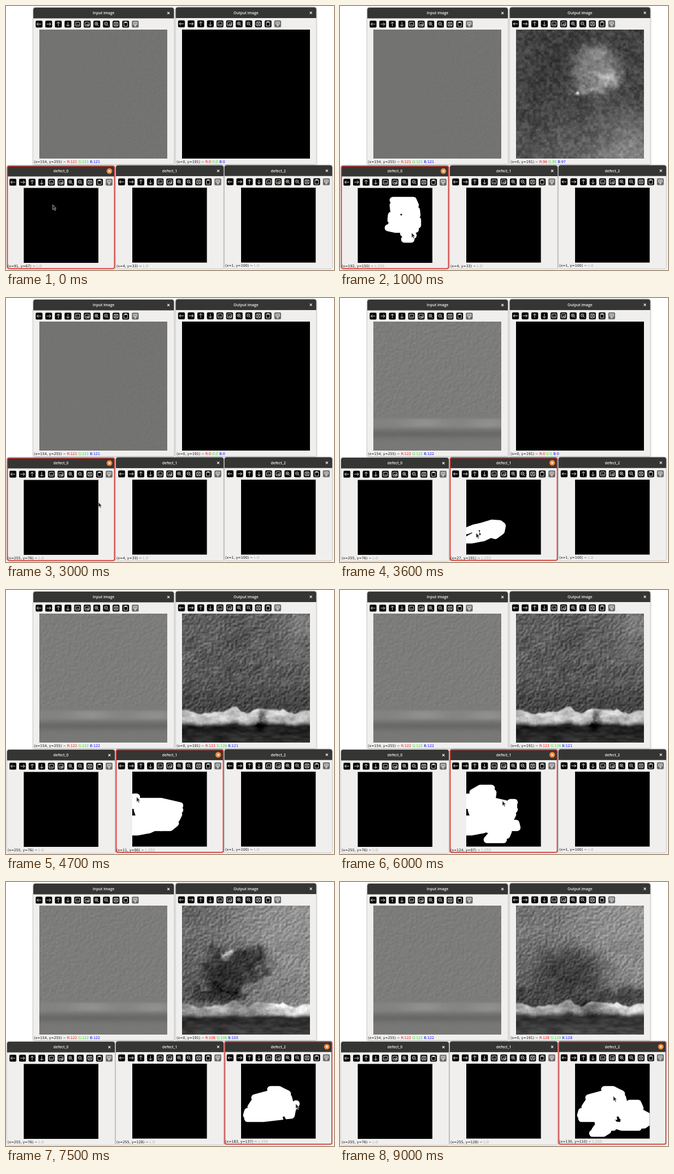
An HTML page with a canvas for the animation above (9.2 s loop, 600 px wide and 481 px high).

```html
<!DOCTYPE html>
<html lang="en">
<head>
<meta charset="utf-8">
<title>Defect painter</title>
<style>
html, body { margin: 0; width: 600px; height: 481px; overflow: hidden; background: #fff; }
#stage, canvas { position: absolute; left: 0; top: 0; }
.win { filter: drop-shadow(0 .6px 1.6px rgba(0,0,0,.5)); }
.title { font: 600 6.8px "Open Sans", sans-serif; fill: #f4f4f2; text-anchor: middle; }
.status { font: 6.35px "DejaVu Sans", sans-serif; fill: #111; white-space: pre; }
.brush { fill: none; stroke: #fff; stroke-width: 12.6; stroke-linecap: round; stroke-linejoin: round; }
.line { fill: none; stroke: #fff; stroke-width: .9; }
</style>
</head>
<body>
<svg id="stage" width="600" height="481" viewBox="0 0 600 481"></svg>
<canvas id="input" width="234" height="235" style="left:61px;top:43px"></canvas>
<canvas id="output" width="234" height="235" style="left:322px;top:43px"></canvas>
<script>
const LOOP = 9200, STEP = 100;
const $ = id => document.getElementById(id);

// ---------- textures ----------
const mix = (a, b, k) => a + (b - a) * k;
const clamp = (v, lo, hi) => Math.max(lo, Math.min(hi, v));
const ramp = (a, b, v) => { const k = clamp((v - a) / (b - a), 0, 1); return k * k * (3 - 2 * k); };

function hash(i, j) {
  let n = Math.imul(i, 374761393) + Math.imul(j, 668265263);
  n = Math.imul(n ^ n >>> 13, 1274126177);
  return ((n ^ n >>> 16) >>> 0) / 2 ** 32;
}
function noise(x, y) {
  const i = Math.floor(x), j = Math.floor(y), u = ramp(0, 1, x - i), v = ramp(0, 1, y - j);
  return mix(mix(hash(i, j), hash(i + 1, j), u), mix(hash(i, j + 1), hash(i + 1, j + 1), u), v) - .5;
}
const cloud = (x, y, s) => noise(x / s, y / s) + noise(x / s * 2 + 40, y / s * 2) / 2 + noise(x / s * 4, y / s * 4 + 70) / 4;
const relief = (x, y, s) => noise(x / s, y / s) - noise((x + 1.4) / s, (y + 1.4) / s);
const blob = (x, y, cx, cy, rx, ry, k = 2) => Math.exp(-(Math.hypot((x - cx) / rx, (y - cy) / ry) ** k));

function texture(shade, tint = 0) {
  const c = document.createElement('canvas');
  c.width = 234; c.height = 235;
  const g = c.getContext('2d'), im = g.createImageData(234, 235);
  for (let y = 0, p = 0; y < 235; y++) for (let x = 0; x < 234; x++, p += 4) {
    const v = shade(x + 322, y + 43);
    im.data[p] = im.data[p + 1] = v;
    im.data[p + 2] = v - tint;
    im.data[p + 3] = 255;
  }
  g.putImageData(im, 0, 0);
  return c;
}

const flat = (x, y) => 115 + 3 * noise(x / 1.5, y / 1.5) + 5 * relief(x, y, 3) * ramp(330, 520, x);

function faintSeam(x, y) {
  let v = 124 + 16 * relief(x, y, 4) * (1 - ramp(205, 222, y)) + 3 * noise(x / 2, y / 2);
  v += ramp(216, 222, y) * (1 - ramp(232, 240, y)) * (6 + 14 * blob(x, y, 415, 227, 40, 12) + 14 * blob(x, y, 530, 229, 35, 12));
  return v - 18 * blob(x, y, 440, 247, 400, 8) - 4 * ramp(236, 260, y);
}

function mottled(x, y, lit) {
  return 66 + 34 * cloud(x, y, 5) + 16 * cloud(x, y, 40) + lit * (52 * ramp(150, 290, y) * ramp(330, 550, x) + 14 * ramp(120, 280, y));
}

function patch(x, y) {
  const wx = x + 14 * cloud(x, y, 12), wy = y + 14 * cloud(y, x, 12);
  let v = mottled(x, y, 1);
  v += 52 * blob(wx, wy, 467, 116, 46, 50, 6);
  v += 72 * blob(wx, wy, 489, 132, 19, 15) + 45 * blob(wx, wy, 452, 154, 28, 7);
  v += 130 * blob(x, y, 434, 158, 3, 3) + 24 * blob(x, y, 462, 85, 26, 14);
  return v;
}

const crater = tail => (x, y) => {
  const wx = x + 15 * cloud(x, y, 13), wy = y + 15 * cloud(y, x, 13);
  let v = mottled(x, y, .1) - 4;
  const body = Math.max(blob(wx, wy, 470, 116, 44, 48, 5), blob(wx, wy, 465, 165, 50, 54, 5),
    tail * blob(wx, wy + (wx - 400) * .6, 402, 208, 24, 38, 3) * .55);
  v = mix(v, 112 + 30 * cloud(x, y, 5), body);
  v += 60 * blob(wx, wy, 452, 160, 25, 20) + 95 * blob(x, y, 444, 85, 6, 5);
  v += 45 * blob(wx, wy, 465, 207, 36, 8) + 50 * blob(wx, wy, 440, 190, 12, 14);
  v = mix(v, 52 + 30 * cloud(x, y, 6), blob(wx, wy, 467, 192, 26, 13, 4));
  v -= 60 * blob(wx, wy, 460, 181, 26, 2.5);
  if (tail) {
    v += 115 * blob(wx, wy, 383, 240, 9, 8, 3) + 45 * blob(wx, wy, 411, 211, 14, 7);
    v -= 34 * blob(wx, wy, 380, 222, 9, 7);
  }
  return v;
};

function seam(v, x, y, top, bottom, bright, under) {
  const w = 12 * cloud(x, 3, 22);
  v = mix(v, under + 26 * cloud(x, y * 3, 16) + 18 * ramp(250, 278, y), ramp(bottom - 4, bottom + 5, y));
  const k = ramp(top - 2, top + 3, y + w) * (1 - ramp(bottom - 8, bottom + 4, y + w * .5));
  return mix(v, bright + 60 * cloud(x, y * 2, 18) + 18 * cloud(x, y, 3), k);
}
const plaster = (x, y) => 60 * relief(x, y, 4) + 14 * cloud(x, y, 4);

function ridge(x, y) {
  let v = 88 + 32 * ramp(440, 556, x) * (1 - ramp(60, 200, y)) + plaster(x, y) + 22 * cloud(x, y, 24);
  v += 40 * Math.max(0, cloud(x, y, 11)) * blob(x, y, 440, 140, 100, 45);
  v = mix(v, 62 + plaster(x, y), .7 * ramp(160, 205, y));
  v = seam(v, x, y, 218, 244, 190 + 25 * blob(x, y, 420, 230, 60, 40), 30);
  return v - 110 * blob(x + 8 * cloud(x, y, 9), y, 467, 233, 7, 14);
}

function hollow(x, y) {
  const wx = x + 20 * cloud(x, y, 15), wy = y + 20 * cloud(y, x, 15);
  let v = 104 + 42 * ramp(330, 540, x) - 10 * ramp(100, 215, y) + plaster(x, y) + 14 * cloud(x, y, 30);
  const hole = Math.max(blob(wx, wy, 402, 163, 42, 46, 5), blob(wx, wy, 440, 147, 44, 34, 5), blob(wx, wy, 392, 199, 46, 18, 5));
  v = mix(v, 47 + plaster(x, y) * .7 + 20 * cloud(x, y, 14), hole);
  v += 130 * blob(wx, wy, 409, 127, 8, 8) + 45 * blob(wx, wy, 462, 150, 12, 7);
  v -= 26 * blob(wx, wy, 400, 194, 45, 3);
  return seam(v, x, y, 221, 243, 150 + 80 * ramp(440, 520, x) + 40 * blob(x, y, 390, 228, 28, 12), 44);
}

function stain(x, y) {
  const wx = x + 16 * cloud(x, y, 18), wy = y + 16 * cloud(y, x, 18);
  let v = 118 + 30 * ramp(360, 556, x) - 8 * ramp(50, 180, y) + plaster(x, y) + 14 * cloud(x, y, 30);
  const dark = Math.max(.95 * blob(wx, wy, 418, 170, 72, 52, 4), .85 * ramp(175, 206, wy));
  v = mix(v, 60 + plaster(x, y) * .8 + 20 * cloud(x, y, 15), dark);
  v = seam(v, x, y, 220, 241, 172 + 45 * ramp(480, 520, x), 52);
  return v - 60 * blob(x, y, 456, 230, 22, 12);
}

const black = texture(() => 0);
const inputs = [texture(flat, 2), texture(faintSeam, 2)];
const outputs = [
  [0, black, 0, 0, 0],
  [700, texture(patch), 96, 95, 97],
  [1300, texture(crater(0)), 90, 89, 90],
  [2000, texture(crater(1)), 85, 85, 86],
  [3000, black, 0, 0, 0],
  [4300, texture(ridge), 123, 126, 121],
  [6300, black, 0, 0, 0],
  [7200, texture(hollow), 108, 106, 105],
  [8300, texture(stain), 128, 129, 128]
];

// ---------- windows ----------
const wins = [
  { title: 'Input image', x: 50, y: 3, w: 257, h: 285.5, tool: 60.5, sx: 51 },
  { title: 'Output image', x: 310.5, y: 2.5, w: 257, h: 286, tool: 321, sx: 312 },
  { title: 'defect_0', x: 2, y: 291, w: 197, h: 188, tool: 12.6, sx: 3, ix: 32.5, iy: 331.5 },
  { title: 'defect_1', x: 201, y: 290.5, w: 197, h: 188, tool: 211.5, sx: 202, ix: 231, iy: 331 },
  { title: 'defect_2', x: 399.7, y: 290.3, w: 197, h: 188, tool: 410, sx: 401, ix: 430, iy: 331 }
];
const SIDE = 136.5, UNIT = SIDE / 256;

const arrow = '<path class="line" d="M4 0H-4M-1-3L-4 0L-1 3"/>';
const lens = sign => `<circle class="line" cx="-.8" cy="-.8" r="2.8"/><path class="line" d="M1.3 1.3L4 4M-2.2-.8H.6${sign}"/>`;
const frame = '<rect class="line" x="-3.8" y="-3.6" width="7.6" height="7.2" rx=".8"/>';
const icons = [
  arrow,
  `<g transform="rotate(180)">${arrow}</g>`,
  `<g transform="rotate(90)">${arrow}</g>`,
  `<g transform="rotate(-90)">${arrow}</g>`,
  frame + '<path class="line" d="M-2.4 2L-.8.4L.4 1.6L2.4 1.4M-1.8-1.6H-.6"/>',
  frame + '<path class="line" d="M-2.6 2L-.8 0L.6 1.4"/><circle class="line" cx="1.6" cy="1.2" r="1.6"/>',
  lens('M-.8-2.2V.6'),
  lens(''),
  frame + '<path class="line" d="M-1.8-3.4V-1.2H1.8V-3.4M-1.8 3.4V.8H1.8V3.4"/>',
  '<path class="line" d="M-3.2-3.4H3.2V4H-3.2ZM-1.4-4.2H1.4V-2.6H-1.4Z"/>',
  '<path class="line" d="M-3.4-3.6H3.4V.6H-3.4ZM-2-1.6H2M-1 .8V3.8H1V.8"/>'
];

function windowMarkup(o, i) {
  const { x, y, w, h } = o, cx = x + w - 9.8, cy = y + 9.8;
  const top = `M${x} ${y + 19.5}V${y + 4}q0-4 4-4H${x + w - 4}q4 0 4 4V${y + 19.5}Z`;
  const tools = icons.map((ic, k) =>
    `<g transform="translate(${o.tool + k * 17.6} ${y + 30})"><rect x="-6.2" y="-6.2" width="12.4" height="12.4" rx="2" fill="${k < 10 ? '#000' : '#6a6a6a'}"/>${ic}</g>`).join('');
  const mask = o.ix === undefined ? '' :
    `<clipPath id="clip${i}"><rect x="${o.ix}" y="${o.iy}" width="${SIDE}" height="${SIDE}"/></clipPath>
     <rect x="${o.ix}" y="${o.iy}" width="${SIDE}" height="${SIDE}"/><g id="mask${i}" clip-path="url(#clip${i})"></g>`;
  return `<g class="win"><rect x="${x}" y="${y + 8}" width="${w}" height="${h - 8}" fill="#f0efee"/><path d="${top}" fill="#353633"/></g>
    <rect id="edge${i}" x="${x + .6}" y="${y + .6}" width="${w - 1.2}" height="${h - 1.2}" rx="3" fill="none" stroke="#dc3a35" stroke-width="1.7"/>
    <circle id="hot${i}" cx="${cx}" cy="${cy}" r="5.2" fill="#ee8434"/>
    <path d="M${cx - 2} ${cy - 2}l4 4m0-4l-4 4" stroke="#fff" stroke-width="1.1"/>
    <text class="title" x="${x + w / 2}" y="${y + 12.2}">${o.title}</text>${tools}${mask}
    <text class="status" id="status${i}" x="${o.sx}" y="${y + h - (i < 2 ? 2.3 : 3)}"></text>`;
}
$('stage').innerHTML = wins.map(windowMarkup).join('') +
  '<path id="cursor" d="M0 0V9.2L2.1 7.3L3.7 10.7L5.2 10L3.6 6.7H6.4Z" fill="#222" stroke="#ddd" stroke-width=".7"/>';

// ---------- brush strokes ----------
// rows are [y, x1, x2], swept back and forth
const sweep = rows => 'M' + rows.map(([y, a, b], i) => i % 2 ? `${b} ${y}L${a} ${y}` : `${a} ${y}L${b} ${y}`).join('L');

const strokes = [
  [2, 100, 700, sweep([[354, 97, 134], [363, 97, 138], [372, 98, 140], [381, 94, 141], [390, 93, 142], [399, 94, 142]])],
  [2, 700, 1000, 'M142 399L100 403L88 404L102 407L138 407L116 414L134 418L118 425L130 425L131 413'],
  [2, 1200, 2000, 'M131 413L116 427L96 424L112 416L84 416L104 408L88 404L76 425L66 432L60 437L60 446L64 449L67 440L84 424L95 411L88 398'],
  [2, 2200, 2600, 'M88 396C80 388 75 392 72 389C66 384 67 377 72 375C75 374 77 373 79 373'],
  [3, 3400, 3600, 'M232 424L245 419L258 416L278 410L292 411L297 415L295 425L284 433L262 426L272 415L288 420L268 434L285 426L262 437L240 441L232 441L246 433L249 428'],
  [3, 3700, 4200, sweep([[433, 234, 300], [425, 236, 310], [417, 233, 312], [409, 243, 316], [401, 240, 318]])],
  [3, 4400, 4900, sweep([[393, 234, 318], [385, 234, 283], [377, 234, 279], [369, 243, 280], [361, 257, 277]])],
  [3, 5000, 5500, sweep([[425, 295, 322], [433, 262, 324], [440, 280, 308], [447, 276, 305], [455, 269, 299]])],
  [3, 5700, 5900, 'M306 392L319 387L312 387L319 400L308 392'],
  [4, 6700, 7200, sweep([[378, 484, 499], [386, 481, 515], [393, 455, 517], [401, 454, 519], [410, 448, 522], [418, 442, 523], [425, 440, 521], [431, 442, 470]])],
  [4, 7300, 7500, 'M500 422L522 425L524 414L531 404L530 404'],
  [4, 7700, 8200, sweep([[403, 530, 545], [412, 525, 549], [420, 523, 551], [428, 521, 566], [436, 519, 566], [443, 503, 556], [447, 516, 546]])],
  [4, 8400, 8800, sweep([[439, 472, 500], [447, 470, 500], [453, 466, 490], [458, 462, 482]])]
].map(([win, t0, t1, d]) => {
  const el = document.createElementNS('http://www.w3.org/2000/svg', 'path');
  el.setAttribute('class', 'brush');
  el.setAttribute('d', d);
  $('mask' + win).append(el);
  return { win, t0, t1, el, len: el.getTotalLength() };
});
$('mask2').insertAdjacentHTML('beforeend', '<circle cx="112" cy="380" r="1.6"/>');
$('mask4').insertAdjacentHTML('beforeend', '<path d="M506 428L509 427L512 432L511 438L508 435Z"/>');

// when each mask window is in use: [from, to, text before, text after]
const visits = {
  2: [0, 3000, '', [255, 76]],
  3: [3200, 6400, [4, 33], [255, 128]],
  4: [6700, LOOP, [1, 100], '']
};

const stops = [[0, 85.5, 362], [2900, 165, 372], [3000, 169, 372], [3200, 232, 424], [6000, 297, 384], [6300, 367, 399], [6500, 440, 395], [9000, 500, 390]];
for (const s of strokes) for (const [t, at] of [[s.t0, 0], [s.t1, s.len]]) {
  const p = s.el.getPointAtLength(at);
  stops.push([t, p.x, p.y]);
}
stops.sort((a, b) => a[0] - b[0]);

// offset between the drawn pointer and the reported pixel
const lag = [[0, -8, 10], [1000, 7, -3], [2600, -7, -1], [3600, -7, 9], [6000, 0, -2], [7500, -5, 0], [9000, -1, -1]];

function along(keys, t) {
  let i = 0;
  while (i < keys.length - 2 && keys[i + 1][0] <= t) i++;
  const a = keys[i], b = keys[i + 1], k = clamp((t - a[0]) / (b[0] - a[0] || 1), 0, 1);
  return [mix(a[1], b[1], k), mix(a[2], b[2], k)];
}

const place = (x, y) => `(x=${x}, y=${y}) ~ `;
const rgb = (r, g, b) => `<tspan fill="#f00">R:${r}</tspan> <tspan fill="#1fe01f">G:${g}</tspan> <tspan fill="#00f">B:${b}</tspan>`;
const level = v => `<tspan fill="#a5a5a5">L:${v}</tspan>`;

function pointer(t) {
  const s = strokes.find(s => t > s.t0 && t < s.t1);
  if (!s) return along(stops, t);
  const p = s.el.getPointAtLength(s.len * (t - s.t0) / (s.t1 - s.t0));
  return [p.x, p.y];
}

function draw(t) {
  const [cx, cy] = pointer(t), tip = $('stage').createSVGPoint();
  tip.x = cx;
  tip.y = cy;
  $('cursor').setAttribute('transform', `translate(${cx} ${cy})`);

  let lit = false;
  for (const s of strokes) {
    const k = clamp((t - s.t0) / (s.t1 - s.t0), 0, 1), shown = k > 0 && t < visits[s.win][1];
    s.el.style.display = shown ? '' : 'none';
    if (!shown) continue;
    s.el.style.strokeDasharray = k < 1 ? `${s.len * k} ${s.len + 20}` : 'none';
    if (k < 1 || s.el.isPointInStroke(tip)) lit = true;
  }

  const active = t < 3400 ? 2 : t < 6700 ? 3 : 4;
  wins.forEach((o, i) => {
    $('edge' + i).style.display = $('hot' + i).style.display = i === active ? '' : 'none';
  });

  const [dx, dy] = along(lag, t);
  for (const i of [2, 3, 4]) {
    const [from, to, before, after] = visits[i], o = wins[i];
    const px = (v, origin, d) => clamp(Math.round((v - origin) / UNIT + d), 0, 255);
    const live = t >= from && t < to;
    const at = live ? [px(cx, o.ix, dx), px(cy, o.iy, dy)] : t < from ? before : after;
    $('status' + i).innerHTML = place(...at) + level(live && lit ? 255 : 0);
  }

  const scene = t < 3100 ? 0 : 1, g = 121 + scene;
  $('input').getContext('2d').drawImage(inputs[scene], 0, 0);
  $('status0').innerHTML = place(154, 255) + rgb(g, g, g);

  const out = outputs.filter(o => o[0] <= t).pop();
  $('output').getContext('2d').drawImage(out[1], 0, 0);
  $('status1').innerHTML = place(0, 191) + rgb(...out.slice(2));
}

let last = -1;
const start = performance.now();
function tick() {
  const t = Math.min(Math.floor((performance.now() - start) % LOOP / STEP) * STEP, 9000);
  if (t !== last) draw(last = t);
  requestAnimationFrame(tick);
}
tick();
</script>
</body>
</html>
```
